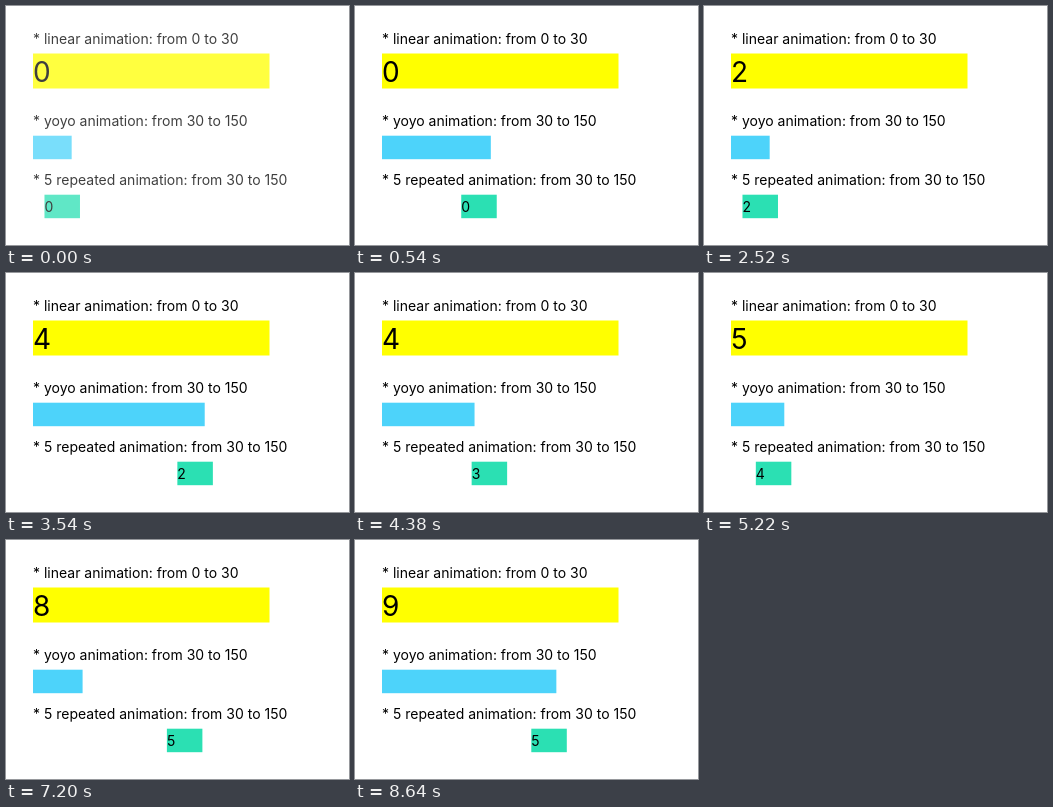
These frames come from a looping animation (343 px wide and 239 px high, 8700 ms). An HTML page:

```html
<!DOCTYPE html>
<html lang="en">
<head>
<meta charset="utf-8">
<title>Number animations</title>
<style>
  html, body { margin: 0; width: 100%; height: 100%; overflow: hidden; background: #fff; }
  svg { display: block; width: 343px; height: 239px; }
  text { font: 14px Inter, "Liberation Sans", sans-serif; fill: #000; }
  #count { font-size: 28px; }
</style>
</head>
<body>
<svg viewBox="0 0 343 239">
  <g id="page">
    <text x="27" y="37.7">* linear animation: from 0 to 30</text>
    <rect x="27" y="47.5" width="236.5" height="35" fill="#ffff00"/>
    <text id="count" x="27" y="75.7">0</text>

    <text x="27" y="119.7">* yoyo animation: from 30 to 150</text>
    <rect id="yoyo" x="27" y="129.7" width="36" height="23.5" fill="#4dd3fa"/>

    <text x="27" y="178.7">* 5 repeated animation: from 30 to 150</text>
    <g id="repeat">
      <rect y="188.7" width="35.5" height="23.5" fill="#2be0b3"/>
      <text id="runs" y="205.7">0</text>
    </g>
  </g>
</svg>
<script>
  const LOOP = 8700, STEP = 60, RUN = 1260, SECOND = 900, FADE = 120;
  const REPEATS = 5;
  const $ = id => document.getElementById(id);
  const [page, count, yoyo, repeat, runs] = ["page", "count", "yoyo", "repeat", "runs"].map($);

  const ease = p => (1 - Math.cos(Math.PI * p)) / 2;
  const mix = (a, b, p) => a + (b - a) * p;

  function draw(t) {
    page.setAttribute("opacity", mix(0.75, 1, Math.min(t / FADE, 1)));
    count.textContent = Math.floor(t / SECOND + 0.1);

    // a cosine of the whole phase runs forwards and backwards in turn
    yoyo.setAttribute("width", mix(36.2, 175.5, ease(t / RUN + 0.085)));

    const phase = t / RUN + 0.07;
    const run = Math.min(Math.floor(phase), REPEATS);
    const x = mix(36.8, 176.3, ease(Math.min(phase - run, 1)));
    repeat.setAttribute("transform", `translate(${x} 0)`);
    runs.textContent = run;
  }

  const start = performance.now();
  function tick() {
    const t = (performance.now() - start) % LOOP;
    draw(Math.floor(t / STEP) * STEP);
    requestAnimationFrame(tick);
  }
  tick();
</script>
</body>
</html>
```
